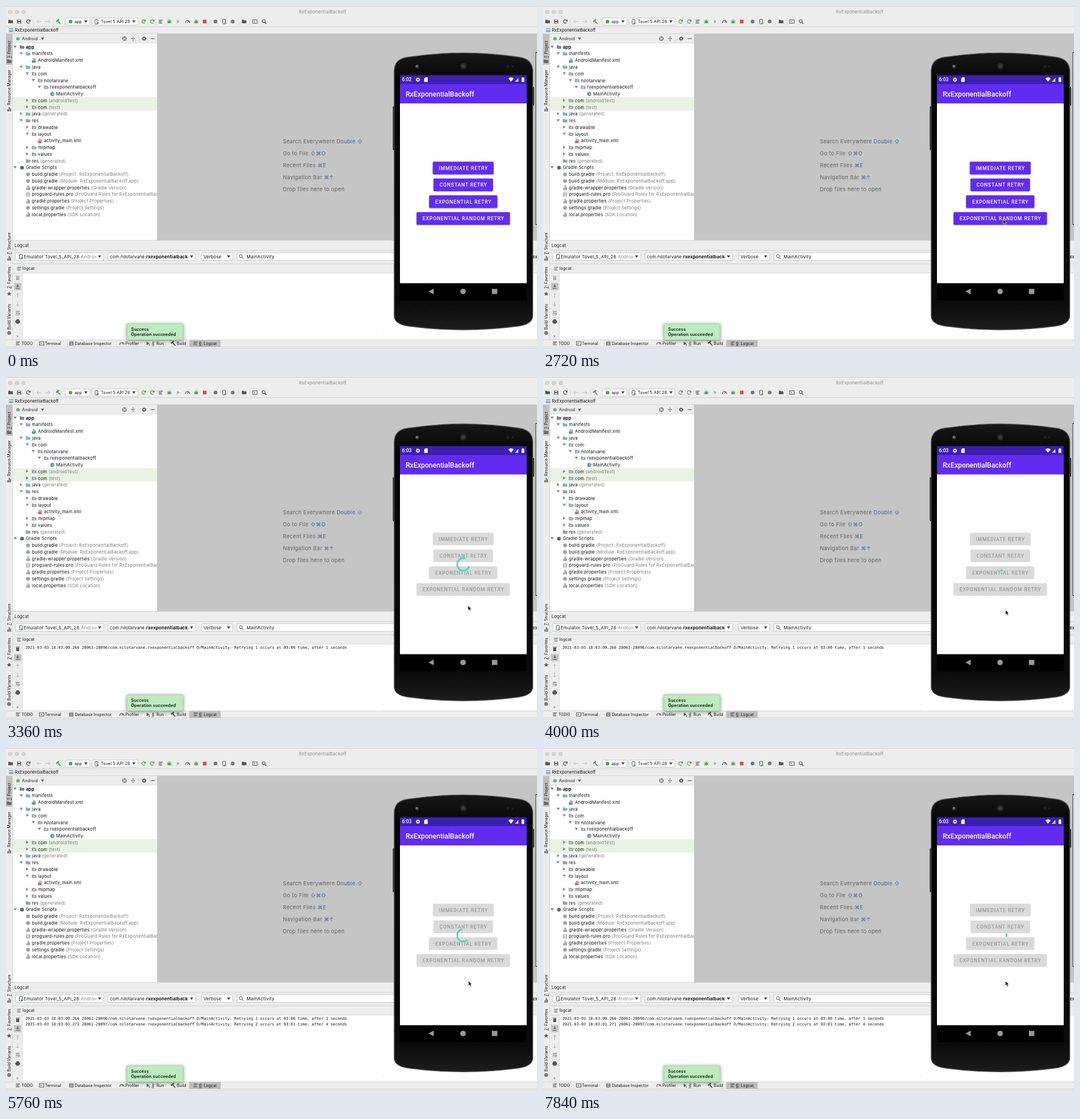
Animation, 930 px wide and 602 px high, one loop 8 s. Source, as an HTML page:

```html
<!DOCTYPE html>
<html lang="en">
<head>
<meta charset="utf-8">
<title>RxExponentialBackoff</title>
<style>
  html, body { margin: 0; width: 100%; height: 100%; overflow: hidden; background: #ececec; }
  svg { display: block; }
  text { font-family: Inter, "DejaVu Sans", sans-serif; white-space: pre; }
  .phone text { font-family: Roboto, sans-serif; font-weight: 500; }
  text.log { font-family: "DejaVu Sans Mono", monospace; }
  .u { text-decoration: underline; }
  .buttons rect { fill: #612cf0; filter: drop-shadow(0 1px 1px #0005); }
  .buttons text { fill: #fff; letter-spacing: .83px; }
  .off rect { fill: #dadada; filter: none; }
  .off text { fill: #999; }
</style>
</head>
<body>
<script>
const PKG = 'com.nilotarvane.rxexponentialbackoff';
const DARK = '#555', GREEN = '#55a05a', BLUE = '#7fb2cf', GRAY = '#9aa1a6';

const rect = (x, y, w, h, fill, more = '') =>
  `<rect x="${x}" y="${y}" width="${w}" height="${h}" fill="${fill}" ${more}/>`;
const dot = (x, y, r, fill, more = '') => `<circle cx="${x}" cy="${y}" r="${r}" fill="${fill}" ${more}/>`;
const text = (x, y, s, size = 7, fill = '#111', more = '') =>
  `<text x="${x}" y="${y}" font-size="${size}" fill="${fill}" ${more}>${s}</text>`;
const fillPath = (d, fill, more = '') => `<path d="${d}" fill="${fill}" ${more}/>`;
const line = (d, color = DARK, w = 1, more = '') =>
  `<path d="${d}" fill="none" stroke="${color}" stroke-width="${w}" ${more}/>`;
const at = (x, y, s, more = '') => `<g transform="translate(${x} ${y})" ${more}>${s}</g>`;
const clip = (x, y, w, h, s) => `<svg x="${x}" y="${y}" width="${w}" height="${h}">${s}</svg>`;
const spaced = n => `letter-spacing="${n}"`;
const under = c => `<tspan class="u">${c}</tspan>`;
const down = (x, y, c = '#888') => fillPath(`M${x - 3} ${y - 2}h6l-3 4.2z`, c);
const right = (x, y, c = '#888') => fillPath(`M${x - 2} ${y - 3}v6l4.2-3z`, c);

// Every icon is drawn around its own centre.
const icons = {
  folder: c => fillPath('M-4-3h3l1 1h4v5h-8z', c),
  pkg: c => icons.folder(c) + dot(0, .6, 1.1, '#fff'),
  save: c => fillPath('M-3.5-3.5h6l1 1v6h-7z', c) + rect(-2, -3, 4, 2, '#eee') + rect(-2, 1, 4, 2, '#eee'),
  cycle: c => line('M3-1A3.1 3.1 0 1 0 2.4 2', c, 1.2) + fillPath('M4-4v4h-4z', c),
  arrow: c => line('M4 0h-8m3-3l-3 3l3 3', c),
  hammer: c => line('M-1-1L3.5 4', c, 1.8) + line('M-4 0L1-4', c, 2.4),
  lines: c => line('M-3.5-2.5h7M-3.5 0h5M-3.5 2.5h6', c, 1.2),
  bug: c => dot(0, .5, 2.6, c) + line('M-4-2l8 5M-4 3l8-5M-4 .5h8M-1.5-4l1 2M1.5-4l-1 2', c, .8),
  gauge: c => line('M-3.5 2.5A3.6 3.6 0 1 1 3.5 2.5M0 1.5L2-1', c, 1.2),
  stop: c => rect(-3.2, -3.2, 6.4, 6.4, c),
  mark: c => dot(0, 0, 3.3, c),
  device: c => rect(-2.5, -4, 5, 8, 'none', `stroke="${c}" rx=".7"`) + dot(2.2, 2.6, 1.7, GREEN),
  frame: c => rect(-4, -3, 8, 6, 'none', `stroke="${c}"`) + line('M-2-1l2 1l-2 1', c, .8),
  search: c => dot(-.7, -.7, 2.6, 'none', `stroke="${c}" stroke-width="1.2"`) + line('M1.2 1.2L4 4', c, 1.3),
  target: c => dot(0, 0, 3.4, 'none', `stroke="${c}"`) + line('M-3.4 0h2.2M1.2 0h2.2M0-3.4v2.2M0 1.2v2.2', c),
  split: c => line('M-3.5 0h7M0-4v2.6M0 1.4v2.6', c),
  gear: c => dot(0, 0, 2.2, 'none', `stroke="${c}" stroke-width="1.6"`) +
    dot(0, 0, 3.4, 'none', `stroke="${c}" stroke-width="1" stroke-dasharray="1.33 1.33"`),
  minus: c => line('M-3.5 0h7', c, 1.2),
  trash: c => fillPath('M-2.6-2h5.2v6h-5.2zM-3.4-3.6h6.8v1h-6.8z', c),
  file: c => fillPath('M-2.6-4h4l2 2v6h-6z', '#b5bcc1') + rect(-4, 0, 6, 4, c),
  bars: c => fillPath('M-3 0h1.7v4h-1.7zM-.7-4h1.7v8h-1.7zM1.7-1.5h1.6v5.5h-1.6z', c),
  cls: c => dot(0, 0, 4, c) + text(-2.2, 2.3, 'C', 6, '#235'),
  play: c => fillPath('M-2.5-3v6l5-3z', c),
  print: c => fillPath('M-2.5-4h5v2h1.5v4h-1.5v1.5h-5v-1.5h-1.5v-4h1.5z', c),
  table: c => line('M-3-3h6v6.2h-6zM-3-1h6M-3 1h6', c),
  star: c => fillPath('M0-4l1.1 2.7l2.9.2l-2.2 1.9l.7 2.8l-2.5-1.6l-2.5 1.6l.7-2.8l-2.2-1.9l2.9-.2z', c),
};
const icon = (name, x, y, c = DARK, more = '') => at(x, y, icons[name](c), more);

function toolbar() {
  const tools = [['folder', 8], ['save', 23], ['cycle', 39], ['arrow', 58, '#bbb'], ['hammer', 92, GREEN],
    ['cycle', 241, GREEN], ['cycle', 256, GREEN], ['lines', 271], ['bug', 286, GREEN], ['play', 302, '#aaa'],
    ['gauge', 318], ['bug', 333, GREEN], ['stop', 348, '#d2504c'], ['mark', 367, '#6d7679'], ['device', 382],
    ['mark', 397, '#777'], ['folder', 417], ['frame', 436], ['search', 452]];
  return rect(0, 0, 930, 49, '#ededed') + rect(0, 0, 930, 1, '#d2d2d2') +
    [7.5, 19, 31].map(x => dot(x, 10.5, 3.2, '#d5d5d5', 'stroke="#bebebe" stroke-width=".6"')).join('') +
    text(513, 13.2, 'RxExponentialBackoff', 7.7, '#898989', spaced(.22)) +
    tools.map(([n, x, c]) => icon(n, x, 27.3, c)).join('') +
    at(73, 27.3, `<g transform="scale(-1 1)">${icons.arrow('#bbb')}</g>`) +
    [48, 83, 357, 407, 427].map(x => line(`M${x} 22v11`, '#d2d2d2', .7)).join('') +
    combo(104, 21, 43, 12.5) + dot(113, 27.5, 3.2, GREEN) + text(120, 30, 'app', 7.2) +
    combo(150.5, 21, 80.5, 12.5) + icon('device', 158.5, 27.5) + text(166, 30, 'Tovel 5 API 28', 7.2, '#111', spaced(.2)) +
    line('M0 36.2h930M0 48.6h930', '#c9c9c9', .8) +
    rect(5, 39, 8, 7, BLUE, 'rx="1"') + rect(5, 41, 8, 1, '#fff') +
    text(15.5, 45.2, 'RxExponentialBackoff', 7.45);
}

const combo = (x, y, w, h) =>
  rect(x, y, w, h, '#fff', 'rx="1.5" stroke="#bdbdbd" stroke-width=".8"') + down(x + w - 7, y + h / 2, '#444');

// depth, label, grey suffix, icon, colour, arrow
const tree = [
  [0, 'app', '', 'folder', '#7d8a90', down], [1, 'manifests', '', 'folder', BLUE, down],
  [2, 'AndroidManifest.xml', '', 'file', '#5d9c76'], [1, 'java', '', 'folder', BLUE, down],
  [2, 'com', '', 'pkg', GRAY, down], [3, 'nilotarvane', '', 'pkg', GRAY, down],
  [4, 'rxexponentialbackoff', '', 'pkg', GRAY, down], [5, 'MainActivity', '', 'cls', '#86bfd4'],
  [2, 'com', '(androidTest)', 'pkg', GRAY, right], [2, 'com', '(test)', 'pkg', GRAY, right],
  [1, 'java', '(generated)', 'folder', BLUE, right], [1, 'res', '', 'folder', GRAY, down],
  [2, 'drawable', '', 'pkg', GRAY, right], [2, 'layout', '', 'pkg', GRAY, down],
  [3, 'activity_main.xml', '', 'file', '#d96a4c'], [2, 'mipmap', '', 'pkg', GRAY, right],
  [2, 'values', '', 'pkg', GRAY, right], [1, 'res', '(generated)', 'folder', GRAY],
  [0, 'Gradle Scripts', '', 'mark', '#5d676b', down],
  [1, 'build.gradle', '(Project: RxExponentialBackoff)', 'mark', GRAY],
  [1, 'build.gradle', '(Module: RxExponentialBackoff.app)', 'mark', GRAY],
  [1, 'gradle-wrapper.properties', '(Gradle Version)', 'bars', '#87907c'],
  [1, 'proguard-rules.pro', '(ProGuard Rules for RxExponentialBackoff)', 'table', GRAY],
  [1, 'gradle.properties', '(Project Properties)', 'bars', '#87907c'],
  [1, 'settings.gradle', '(Project Settings)', 'mark', GRAY],
  [1, 'local.properties', '(SDK Location)', 'bars', '#87907c'],
];

function project() {
  const rows = tree.map(([depth, label, suffix, name, color, arrow], i) => {
    const x = 16 + depth * 10.6, y = 72 + i * 11.76;
    return (arrow ? arrow(x, y - .5) : '') + icon(name, x + 12, y, color) +
      text(x + 18.7, y + 2.7, `${label} <tspan fill="#7b7b7b">${suffix}</tspan>`, 7.7, '#111',
        spaced(.22) + (i ? '' : ' font-weight="700"'));
  });
  return rect(12, 65, 253, 346, '#fff') + rect(12, 160, 253, 23.5, '#eaf3e3') + rows.join('') +
    rect(12, 49, 253, 16, '#ededed') + line('M12 65h253', '#d0d0d0', .7) +
    dot(21, 57.5, 3, '#5db779') + text(28, 60, 'Android', 7.3, '#222', spaced(.1)) + down(64, 57.5, '#666') +
    icon('target', 207.5, 57.3) + icon('split', 222.5, 57.3) + line('M232 52v11', '#ccc', .7) +
    icon('gear', 242, 57.3) + icon('minus', 257, 57.3);
}

function editor() {
  const tips = [['Search Everywhere', 'Double ⇧'], ['Go to File', '⇧⌘O'], ['Recent Files', '⌘E'],
    ['Navigation Bar', '⌘↑'], ['Drop files here to open', '']];
  return rect(265, 49, 665, 362, '#c5c5c5') + line('M265.3 49v362', '#b8b8b8', .7) +
    tips.map(([label, key], i) => text(485, 240.5 + i * 21.1,
      `${label} <tspan fill="#3f6294">${key}</tspan>`, 9.2, '#606060', spaced(.38))).join('');
}

function sidebar() {
  const labels = [[91, `${under(1)}: Project`], [174, 'Resource Manager'], [436, `${under(7)}: Structure`],
    [496, `${under(2)}: Favorites`], [568, 'Build Variants']];
  return rect(0, 49, 12, 537, '#ededed') + rect(0, 49, 11, 54, '#bfbfbf') + line('M11.7 49v537', '#cdcdcd', .7) +
    labels.map(([y, s]) => `<g transform="translate(8 ${y}) rotate(-90)">${text(0, 0, s)}</g>`).join('') +
    icon('folder', 5.5, 97, '#666') + icon('bars', 5.5, 181, '#666') + icon('bars', 5.5, 443, '#666') +
    icon('star', 5.5, 505) + icon('mark', 5.5, 574, '#777');
}

function logcat() {
  const logLine = (id, y, ms, thread, n, s, wait) => text(34, y,
    `2021-03-03 18:03:${ms} 28061-${thread}/${PKG} D/MainActivity: Retrying ${n} occurs at 03:${s} time, after ${wait} seconds`,
    6.84, '#111', `id="${id}" class="log"`);
  return rect(12, 411, 918, 175, '#ededed') + line('M0 411.3h930M12 429h918M12 452.5h918', '#c9c9c9', .8) +
    text(15, 422.5, 'Logcat', 7.4, '#222', spaced(.2)) +
    combo(16.5, 433, 154.5, 13.5) + icon('device', 26, 440) +
    clip(31, 433, 127, 14, text(0, 9.6, 'Emulator Tovel_5_API_28 <tspan fill="#888">Android 9</tspan>', 7.7, '#111', spaced(.33))) +
    combo(178.5, 433, 153.5, 13.5) +
    clip(182, 433, 137, 14, text(0, 9.6, PKG.replace(/rx.*/, '<tspan font-weight="700">$&</tspan>'), 7.7, '#111', spaced(.18))) +
    combo(342.5, 433, 54.5, 13.5) + text(346, 442.6, 'Verbose', 7.6, '#111', spaced(.2)) +
    rect(404.5, 433, 500, 13.5, '#fff', 'stroke="#bdbdbd" stroke-width=".8"') + icon('search', 412, 439.7, '#777') +
    text(421.5, 442.6, 'MainActivity', 7.7, '#111', spaced(.3)) + text(922.5, 442.6, 'ex', 7.7) +
    icon('lines', 23, 461) + text(29, 463.3, 'logcat', 7.1) +
    rect(29, 469, 901, 117, '#fff') + line('M12 468.8h918M28.7 469v117', '#d0d0d0', .7) +
    icon('trash', 20.5, 477, '#aaa', 'id="trash"') + rect(14, 486, 13, 13, '#c6c6c6', 'rx="1"') +
    line('M20.5 488v5m-2-2l2 2l2-2M17 495.5h7', DARK, 1.1) +
    line('M20.5 512v-8m-2.5 3l2.5-3l2.5 3M20.5 519v8m-2.5-3l2.5 3l2.5-3', '#b3b3b3') +
    line('M17 536h7M17 539h6q2 2-1 3h-2M17 542h1.5', DARK) + icon('print', 20.5, 554) +
    text(18, 582, '»', 7, '#666') +
    logLine('log1', 476.8, '00.266', 28096, 1, '00', 1) + logLine('log2', 487.2, '01.271', 28097, 2, '01', 4) +
    dot(661, 574.5, .6, '#bbb');
}

function statusBar() {
  const items = [['lines', 21, 27, 'TODO'], ['frame', 62.5, 68, 'Terminal'], ['table', 114.5, 120.5, 'Database Inspector'],
    ['gauge', 203, 209, 'Profiler'], ['play', 249, 255, `${under(4)}: Run`], ['hammer', 293, 299, 'Build'],
    ['lines', 332, 338, `${under(6)}: Logcat`]];
  return rect(0, 586, 930, 16, '#ededed') + line('M0 586h930M0 598.5h930', '#c9c9c9', .8) +
    rect(0, 601, 930, 1, '#d5d5d5') + rect(321, 586.3, 55, 12, '#bdbdbd') +
    items.map(([n, ix, x, s]) => icon(n, ix, 592.2) + text(x, 594.7, s)).join('') + dot(251, 595, 1.2, GREEN) +
    rect(212, 558, 98, 28, '#bdecbd', 'stroke="#9ccb9c" stroke-width=".7" style="filter:drop-shadow(0 1px 3px #0007)"') +
    text(219, 569.6, 'Success', 7.3, '#111', 'font-weight="600"' + spaced(.15)) +
    text(219, 579.3, 'Operation succeeded', 7.3, '#111', 'font-weight="600"' + spaced(.15));
}

function phone() {
  const buttons = [[747.5, 273.3, 'IMMEDIATE RETRY'], [748.7, 302.8, 'CONSTANT RETRY'],
    [741, 332.3, 'EXPONENTIAL RETRY'], [719, 361.8, 'EXPONENTIAL RANDOM RETRY']];
  return rect(928, 81.5, 6, 302, '#eee', 'stroke="#222" stroke-width="1"') +
    rect(677.5, 176, 4, 77, '#252525', 'rx="1"') + rect(921, 142, 4, 33, '#252525', 'rx="1"') +
    fillPath('M680 113Q681 93 703 90Q801 75 899 90Q921 93 922.5 113V545Q921 558 899 561.5Q801 575 703 561.5Q681 558 680 545Z',
      'url(#body)', 'stroke="#494949" stroke-width="1.3"') +
    dot(801, 105.5, 5.5, '#292929') + dot(801, 105.5, 2.5, '#414141') +
    dot(720, 106, 3, '#4d4d4d') + dot(719.4, 105.5, 1, '#bbb') + dot(879, 106, 3, '#1d1d1d') + dot(887, 106, 2, '#1d1d1d') +
    rect(690, 121.5, 222, 395, '#000') + rect(690, 121.5, 222, 16, '#3b20b2') +
    rect(690, 170, 222, 316.5, '#fff') + rect(690, 137, 222, 34, '#612cf0') +
    text(693.5, 132.3, '6:02', 8.6, '#fff', 'id="clock"') + icon('gear', 721.5, 129.3, '#fff') +
    fillPath('M732.5 127.3l2-2h4v8h-6z', '#fff') +
    fillPath('M879.8 127q4.7-3.6 9.4 0l-4.7 6z', '#fff') + fillPath('M891 133l6.5-7v7z', '#fff', 'opacity=".75"') +
    fillPath('M903 126h1.3v-1h2v1h1.3v7.2h-4.6z', '#fff') +
    text(700, 158.5, 'RxExponentialBackoff', 12.2, '#fff') +
    fillPath('M740 501l9-5v10z', '#999') + dot(800.5, 501, 4.8, '#999') + rect(851, 496.5, 9.5, 9, '#999') +
    '<g class="buttons" id="buttons">' + buttons.map(([x, y, s]) =>
      rect(x, y, 2 * (800.8 - x), 22.3, '', 'rx="1.8"') +
      text(801.2, y + 14.2, s, 8.6, '', 'text-anchor="middle"')).join('') + '</g>' +
    line('', '#4ad9bd', 2.8, 'id="spinner" stroke-linecap="square"');
}

document.body.innerHTML = `<svg width="100%" height="100%" viewBox="0 0 930 602">
  <defs><linearGradient id="body" x2="0" y2="1">
    <stop stop-color="#171717"/><stop offset=".1" stop-color="#060606"/>
    <stop offset=".9" stop-color="#0b0b0b"/><stop offset="1" stop-color="#1c1c1c"/>
  </linearGradient></defs>
  ${toolbar()}${project()}${editor()}${sidebar()}${logcat()}${statusBar()}
  <g class="phone">${phone()}</g>
  <path id="cursor" d="M0 0v8.3l2-1.8l1.5 3.3l1.6-.7l-1.5-3.2h2.6z" fill="#000" stroke="#fff" stroke-width=".7"/>
</svg>`;

const $ = id => document.getElementById(id);
const LOOP = 8000, STEP = 160, CLICK = 2880;
const show = (id, on) => $(id).setAttribute('visibility', on ? 'visible' : 'hidden');
const clamp = v => Math.min(1, Math.max(0, v));

// Standard material easing: cubic-bezier(.4, 0, .2, 1).
function ease(x) {
  let lo = 0, hi = 1;
  for (let i = 0; i < 20; i++) {
    const u = (lo + hi) / 2, v = 1 - u;
    if (1.2 * v * v * u + .6 * v * u * u + u ** 3 < x) lo = u; else hi = u;
  }
  return 3 * (1 - lo) * lo * lo + lo ** 3;
}

// start, end, from, to
const moves = [[480, 1120, [828, 598], [808, 381]], [1280, 1920, [808, 381], [806, 374.5]], [3040, 3680, [806, 374.5], [810, 409]]];
function cursorAt(t) {
  const [start, end, from, to] = moves.findLast(m => t >= m[0]) || moves[0];
  const k = ease(clamp((t - start) / (end - start)));
  return from.map((v, i) => v + (to[i] - v) * k);
}

function spinnerPath(age) {
  const phase = age / 1333 % 1, turn = phase / 4 + age / 2222;
  const head = .75 * ease(clamp(phase * 2)) + turn;
  const tail = .75 * ease(clamp(phase * 2 - 1)) + turn;
  const point = a => `${801 + 10.8 * Math.sin(a * 2 * Math.PI)} ${328.8 - 10.8 * Math.cos(a * 2 * Math.PI)}`;
  return `M${point(tail)}A10.8 10.8 0 ${head - tail > .5 ? 1 : 0} 1 ${point(Math.max(head, tail + .005))}`;
}

function render(now) {
  const t = Math.floor(now % LOOP / STEP) * STEP;
  $('clock').textContent = t < 2560 ? '6:02' : '6:03';
  $('buttons').classList.toggle('off', t >= CLICK);
  show('spinner', t >= CLICK);
  if (t >= CLICK) $('spinner').setAttribute('d', spinnerPath((t - CLICK) * 1.034));
  show('log1', t >= 3360);
  show('log2', t >= 4320);
  $('trash').firstChild.setAttribute('fill', t >= 3360 ? DARK : '#aaa');
  show('cursor', t >= moves[0][0]);
  $('cursor').setAttribute('transform', `translate(${cursorAt(t)})`);
}

const origin = performance.now();
(function tick() {
  render(performance.now() - origin);
  requestAnimationFrame(tick);
})();
</script>
</body>
</html>
```
